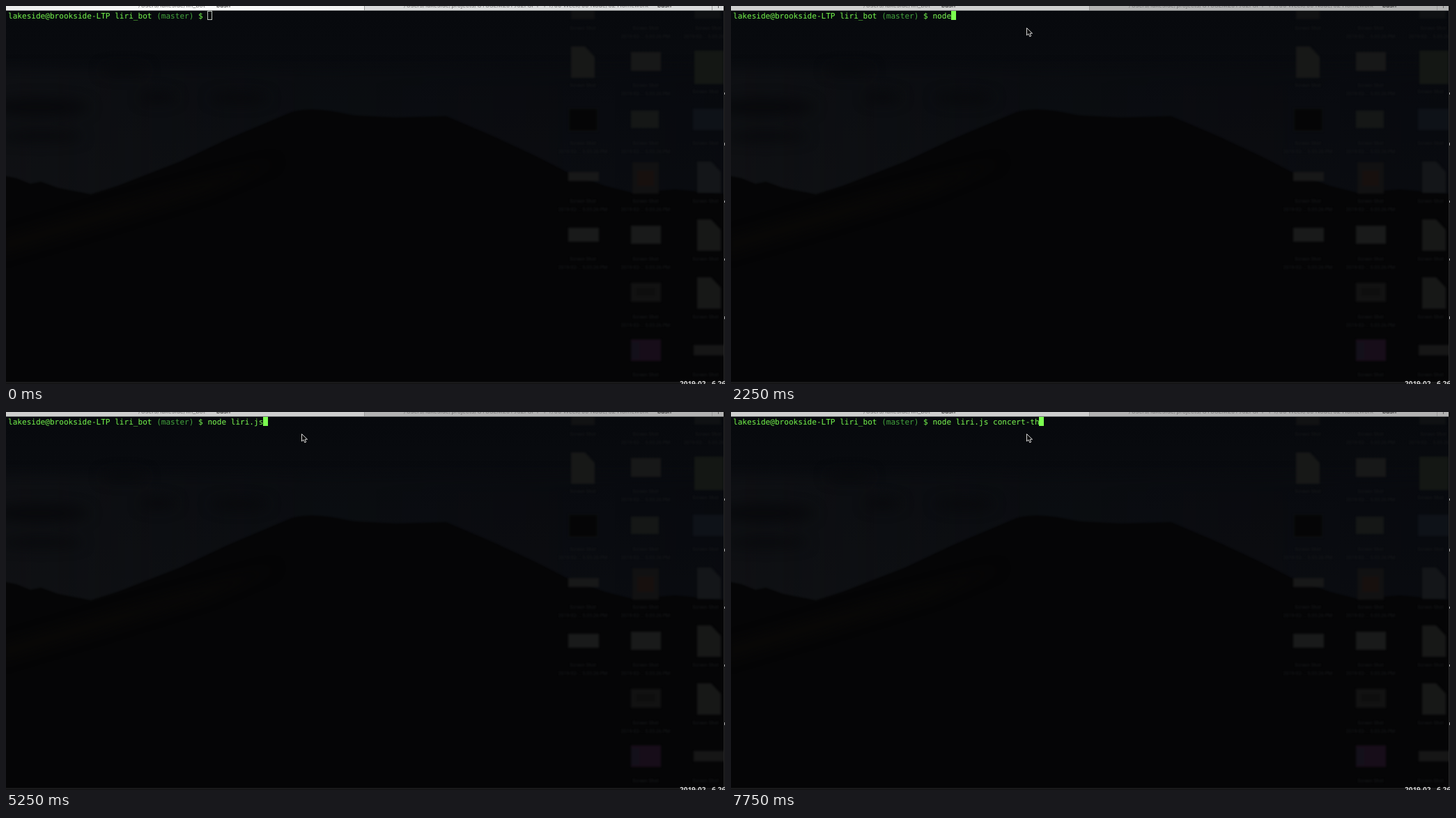
An HTML page that plays this animation: 1032x542 px, repeating every 8000 ms.

```html
<!DOCTYPE html>
<html lang="en">
<head>
<meta charset="utf-8">
<title>Terminal session</title>
<style>
  html, body { margin: 0; width: 100%; height: 100%; overflow: hidden; background: #000; }
  svg { display: block; width: 1032px; height: 542px; }
  filter { color-interpolation-filters: sRGB; }
  text { white-space: pre; text-rendering: geometricPrecision; }
  .line { font: 11.07px "DejaVu Sans Mono", monospace; fill: #74f64c; }
  .branch { fill: #43a33d; }
  .typed { fill: #7cfb52; }
  .tabs { font: 9.2px Roboto, sans-serif; fill: #777; }
  .tabs .job { fill: #222; }
  .labels { font: 7px Roboto, sans-serif; fill: #17191b; text-anchor: middle; filter: url(#soft); }
  .desk { font: bold 10px "Open Sans", sans-serif; fill: #d8d8d8; }
  #leftTab { fill: url(#tabIdle); }
  #rightTab { fill: #dadbdc; }
  .focused #leftTab { fill: #cfcfcf; }
  .focused #rightTab { fill: #b3b3b3; }
  #cursor { fill: none; stroke: #bcc4bc; }
  .focused #cursor { fill: #7cff50; stroke: #7cff50; }
</style>
</head>
<body>
<svg id="stage" viewBox="0 0 1032 542">
  <defs>
    <linearGradient id="sky" x2="0" y2="1">
      <stop offset="0" stop-color="#07090d"/>
      <stop offset=".5" stop-color="#0a0c10"/>
      <stop offset="1" stop-color="#0d0f12"/>
    </linearGradient>
    <linearGradient id="haze">
      <stop offset="0" stop-color="#111215" stop-opacity=".7"/>
      <stop offset=".45" stop-color="#0d0f13" stop-opacity=".3"/>
      <stop offset="1" stop-color="#06080d" stop-opacity=".6"/>
    </linearGradient>
    <linearGradient id="tabIdle">
      <stop offset="0" stop-color="#eceded"/>
      <stop offset=".5" stop-color="#fafafa"/>
      <stop offset="1" stop-color="#f2f2f2"/>
    </linearGradient>
    <filter id="soft"><feGaussianBlur stdDeviation=".9"/></filter>
    <filter id="blur"><feGaussianBlur stdDeviation="1.8"/></filter>
    <filter id="wide" x="-50%" y="-50%" width="200%" height="200%"><feGaussianBlur stdDeviation="9"/></filter>
    <clipPath id="window"><rect y="7" width="1030" height="532"/></clipPath>
  </defs>

  <rect width="1032" height="542" fill="#151516"/>
  <g clip-path="url(#window)">
    <rect y="7" width="1030" height="275" fill="url(#sky)"/>
    <rect x="-40" y="90" width="1110" height="220" fill="url(#haze)" filter="url(#wide)"/>
    <g fill="#08090c" filter="url(#wide)">
      <ellipse cx="45" cy="145" rx="75" ry="13"/>
      <ellipse cx="218" cy="131" rx="26" ry="8"/>
      <ellipse cx="335" cy="132" rx="42" ry="8"/>
      <ellipse cx="170" cy="92" rx="34" ry="7"/>
      <ellipse cx="50" cy="187" rx="60" ry="7"/>
    </g>
    <path fill="#050506" filter="url(#soft)" d="M-5 243 15 247 35 255 50 252 75 261 122 270 160 258 250 223 320 190 410 152Q435 145 475 152L500 157 560 160 632 158 700 187 760 215 805 238 860 258 900 268 960 263 1035 270V545H-5Z"/>
    <path fill="#090807" filter="url(#wide)" d="M-10 335 160 285 390 222 290 265 140 312-10 357Z"/>
    <g id="icons" filter="url(#blur)"></g>
    <g id="labels" class="labels"></g>
  </g>

  <path d="M1030.5 7V539" stroke="#29292a"/>
  <path d="M0 539.5H1030" stroke="#1f1f20"/>
  <path d="M1031.5 124v3M1031.5 196v4M1031.5 279v3M1031.5 362v3M1031.5 445v4" stroke="#aaa"/>
  <text class="desk" x="967" y="545">2019-02...6.26</text>

  <rect id="leftTab" width="514" height="6.5"/>
  <rect id="rightTab" x="514" width="516" height="6.5"/>
  <path d="M514.5 0V6.5M1013.5 0V6.5" stroke="#999"/>
  <path d="M0 6.5H1030" stroke="#77797a"/>
  <path d="M1022.5 0V3" stroke="#666"/>
  <g class="tabs">
    <text x="190" y="1.7">/Users/lakeside/liri_bot</text>
    <text class="job" x="290" y="1.7">— -bash</text>
    <text x="571" y="1.7">/Users/lakeside/projects/GTUSEM201902FSF-P-1-1/06-Week/06-Node/02-Homework</text>
    <text class="job" x="923" y="1.7">— -bash</text>
  </g>

  <rect id="cursor" y="7.5" width="6" height="12"/>
  <text class="line" x="3" y="18">lakeside@brookside-LTP liri_bot <tspan class="branch">(master)</tspan> $ <tspan id="typed" class="typed"></tspan></text>
  <path id="pointer" d="M.5.5V11L3 8.8 4.8 12.8 6.7 12 5 8.2H8.5Z" fill="#080808" stroke="#d8d8d8"/>
</svg>
<script>
  const $ = id => document.getElementById(id);
  const LOOP = 8000, FOCUS = 1250;
  const PROMPT_END = 289.5, CHAR = 6.665;
  const COMMAND = "node liri.js concert-th";

  // [start time, characters on the line]
  const typing = [
    [0, 0], [1750, 1], [2000, 3], [2250, 4], [2750, 5], [3500, 4], [3750, 5],
    [4250, 7], [4500, 9], [4750, 10], [5000, 11], [5250, 12], [5750, 13],
    [6250, 14], [6500, 16], [6750, 17], [7000, 19], [7500, 21], [7750, 23]
  ];
  // [start time, x, y]
  const pointing = [[0, -40, 0], [500, 1002, 9], [750, 570, 104], [1000, 427, 30], [1250, 424, 31]];

  const at = (steps, time) => steps.findLast(step => step[0] <= time);

  function add(parent, tag, attrs, text = "") {
    const node = document.createElementNS("http://www.w3.org/2000/svg", tag);
    for (const key in attrs) node.setAttribute(key, attrs[key]);
    node.textContent = text;
    parent.append(node);
  }

  const thumb = (x, y, width, height, fill = "#171818", stroke = "none") =>
    add($("icons"), "rect", { x, y, width, height, fill, stroke });
  const page = (x, y, fill = "#171817") =>
    add($("icons"), "path", { d: `M${x} ${y}h20l14 15v30h-34z`, fill });

  function label(x, y, lines = 2) {
    add($("labels"), "text", { x, y }, "Screen Shot");
    if (lines > 1) add($("labels"), "text", { x, y: y + 11.5 }, "2019-02-... 5.03.26 PM");
  }

  function drawDesktop() {
    thumb(811, 5, 34, 14, "#111213");
    thumb(988, 5, 38, 13, "#0f1113");
    page(811, 58);
    thumb(897, 66, 43, 27);
    thumb(988, 64, 42, 48, "#141714");
    thumb(808, 147, 41, 32, "#050506", "#111213");
    thumb(897, 150, 40, 25, "#151716");
    thumb(986, 147, 45, 31, "#0e1218");
    thumb(807, 238, 44, 13, "#171818");
    thumb(899, 224, 38, 45, "#111112");
    thumb(906, 236, 24, 22, "#17100e");
    page(992, 223, "#141619");
    thumb(807, 318, 44, 20, "#191a1a");
    thumb(897, 315, 43, 26, "#191a1a");
    page(992, 306);
    thumb(897, 397, 43, 27, "#121212");
    thumb(904, 404, 28, 12, "#0e0e0e");
    page(992, 389);
    thumb(897, 478, 43, 31, "#170d19");
    thumb(897, 482, 12, 24, "#13101a");
    thumb(987, 486, 45, 15, "#161616");

    label(828, 34, 1);
    label(828, 116, 1);
    for (const y of [199, 282, 365]) label(828, y);
    for (const y of [34, 116, 199, 282, 365, 448]) label(918, y);
    label(918, 531, 1);
    label(1008, 34);
    for (const y of [125, 199, 282, 365, 448, 531]) label(1004, y, 1);
  }

  function draw() {
    const time = performance.now() % LOOP;
    const count = at(typing, time)[1];
    const [, x, y] = at(pointing, time);
    $("stage").classList.toggle("focused", time >= FOCUS);
    $("typed").textContent = COMMAND.slice(0, count);
    $("cursor").setAttribute("x", Math.floor(PROMPT_END + count * CHAR) + 0.5);
    $("pointer").setAttribute("transform", `translate(${x} ${y})`);
    requestAnimationFrame(draw);
  }

  drawDesktop();
  draw();
</script>
</body>
</html>
```
